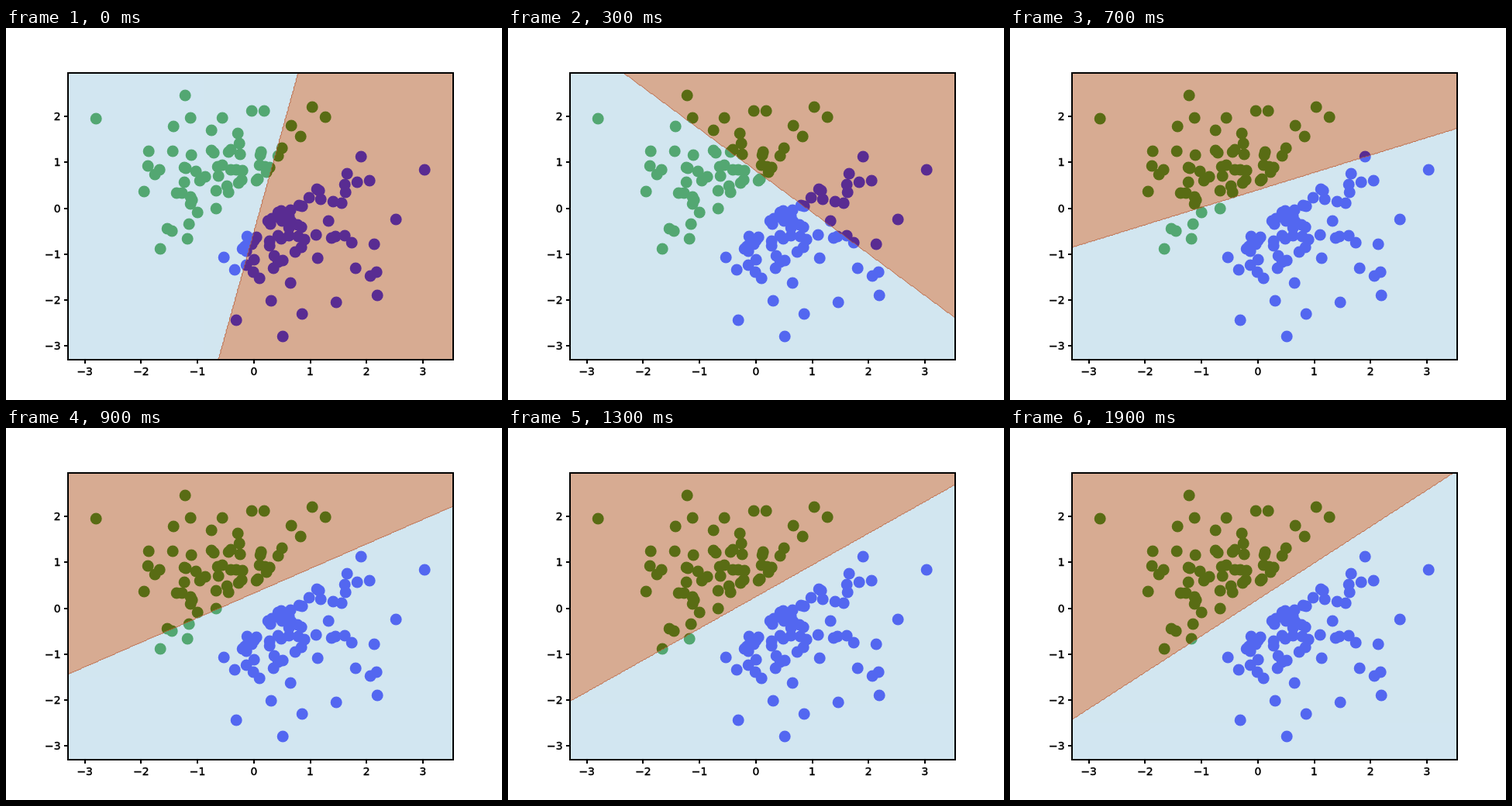
These frames come from a looping animation (640x480 px, 2000 ms). An HTML page:

```html
<!DOCTYPE html>
<html lang="en">
<head>
<meta charset="utf-8">
<title>Linear classifier training</title>
<style>
  html, body { margin: 0; width: 100%; height: 100%; overflow: hidden; background: #fff; }
  svg { display: block; width: 640px; height: 480px; }
  text { font: 13.89px "DejaVu Sans", sans-serif; stroke: #000; stroke-width: .45; }
</style>
</head>
<body>
<svg viewBox="0 0 640 480">
  <clipPath id="box"><rect x="80" y="58" width="497" height="370"/></clipPath>
  <g id="dots"></g>
  <g clip-path="url(#box)">
    <g opacity=".5">
      <rect x="80" y="58" width="497" height="370" fill="#a6cee3"/>
      <path id="area" fill="#b15928"/>
    </g>
    <path id="edge" fill="none" stroke="#b8572f" stroke-opacity=".85"/>
  </g>
  <rect x="80" y="58" width="497" height="370" fill="none" stroke="#000" stroke-width="2"/>
  <g id="axes"></g>
</svg>
<script>
const STEP = 100, STEPS = 20, GRID = 0.02;
const X0 = -3.3, X1 = 3.56, Y0 = -3.3, Y1 = 2.98;
const $ = id => document.getElementById(id);
const px = x => 319.8 + 72.7 * x;
const py = y => 232.5 - 59.33 * y;

// Sample centres in stage pixels, x then y
const greens = [
  116,117, 231,87, 216,127, 238,116, 279,116, 317,107, 333,107, 395,102, 412,115, 368,126,
  380,140, 265,132, 299,136, 301,149, 184,159, 215,159, 239,164, 265,158, 268,161, 287,160,
  290,157, 302,163, 329,160, 328,164, 356,155, 351,165, 183,178, 198,183, 192,189, 230,180,
  232,181, 245,185, 250,197, 257,192, 273,179, 279,177, 274,191, 290,183, 297,183, 305,184,
  327,177, 340,180, 336,186, 334,179, 325,195, 323,197, 304,196, 300,200, 285,204, 287,212,
  271,210, 230,199, 178,211, 220,213, 227,213, 238,218, 240,222, 238,227, 247,238, 271,233,
  236,253, 208,259, 214,262, 234,272, 199,285
];
const blues = [
  458,166, 540,183, 440,188, 453,199, 469,197, 437,202, 438,212, 401,208, 404,210, 391,219,
  406,221, 422,224, 433,226, 378,229, 382,230, 503,247, 416,249, 367,235, 355,236, 351,238,
  361,243, 356,249, 343,246, 338,249, 341,253, 365,243, 368,250, 365,258, 376,254, 381,257,
  365,268, 377,269, 385,273, 351,268, 355,272, 340,275, 340,281, 400,267, 402,297, 381,283,
  373,289, 346,294, 351,302, 357,300, 345,310, 420,271, 425,269, 437,268, 446,277, 475,279,
  451,310, 470,320, 478,315, 479,345, 426,354, 382,369, 367,329, 342,352, 357,398, 297,377,
  281,296, 295,312, 311,269, 323,270, 320,274, 317,279, 312,278, 308,282, 305,285, 310,288,
  320,299, 310,306, 319,315, 327,323
];

function dots(list, fill) {
  let out = "";
  for (let i = 0; i < list.length; i += 2)
    out += `<circle cx="${list[i] + 0.2}" cy="${list[i + 1]}" r="7.5" fill="${fill}"/>`;
  return out;
}

function axes() {
  const label = v => (v < 0 ? "\u2212" : "") + Math.abs(v);
  let marks = "", text = "";
  for (let v = -3; v <= 3; v++) {
    const x = Math.round(px(v)), y = Math.round(py(v));
    marks += `M${x} 428v5`;
    text += `<text x="${px(v)}" y="448" text-anchor="middle">${label(v)}</text>`;
    if (v > 2) continue;
    marks += `M80 ${y}h-5`;
    text += `<text x="70.5" y="${y + 5}" text-anchor="end">${label(v)}</text>`;
  }
  return `<path d="${marks}" stroke="#000" stroke-width="2"/>` + text;
}

// Bias values at a few training steps, linear in between
const biasAt = [[0, -.119], [3, -.332], [5, -.406], [7, -.497], [11, -.594], [15, -.659], [19, -.72]];
function bias(n) {
  const i = Math.max(1, biasAt.findIndex(p => p[0] >= n));
  const [a, u] = biasAt[i - 1], [b, v] = biasAt[i];
  return u + (v - u) * (n - a) / (b - a);
}

// Boundary wx*x + wy*y + b = 0, snapped to the sampling grid
function draw(n) {
  const wx = 1 - 0.2106 * n, wy = 0.2113 * n - 0.227, b = bias(n);
  const steep = Math.abs(wx) > Math.abs(wy);
  const snap = (v, from) => from + (Math.floor((v - from) / GRID) + 0.5) * GRID;
  const at = (x, y) => px(x).toFixed(2) + " " + py(y).toFixed(2);
  const pts = [];
  if (steep) {
    for (let y = Y0; y <= Y1; y += GRID) pts.push(at(snap(-(wy * y + b) / wx, X0), y));
  } else {
    for (let x = X0; x <= X1; x += GRID) pts.push(at(x, snap(-(wx * x + b) / wy, Y0)));
  }
  const far = 9 * Math.sign(steep ? wx : wy);
  const corners = steep ? [at(far, Y1), at(far, Y0)] : [at(X1, far), at(X0, far)];
  const line = "M" + pts.join("L");
  $("edge").setAttribute("d", line);
  $("area").setAttribute("d", line + "L" + corners.join("L") + "Z");
}

$("dots").innerHTML = dots(greens, "#008000") + dots(blues, "#00f");
$("axes").innerHTML = axes();

const start = performance.now();
let shown = -1;
function tick() {
  const n = Math.floor((performance.now() - start) / STEP) % STEPS;
  if (n !== shown) draw(shown = n);
  requestAnimationFrame(tick);
}
tick();
</script>
</body>
</html>
```
